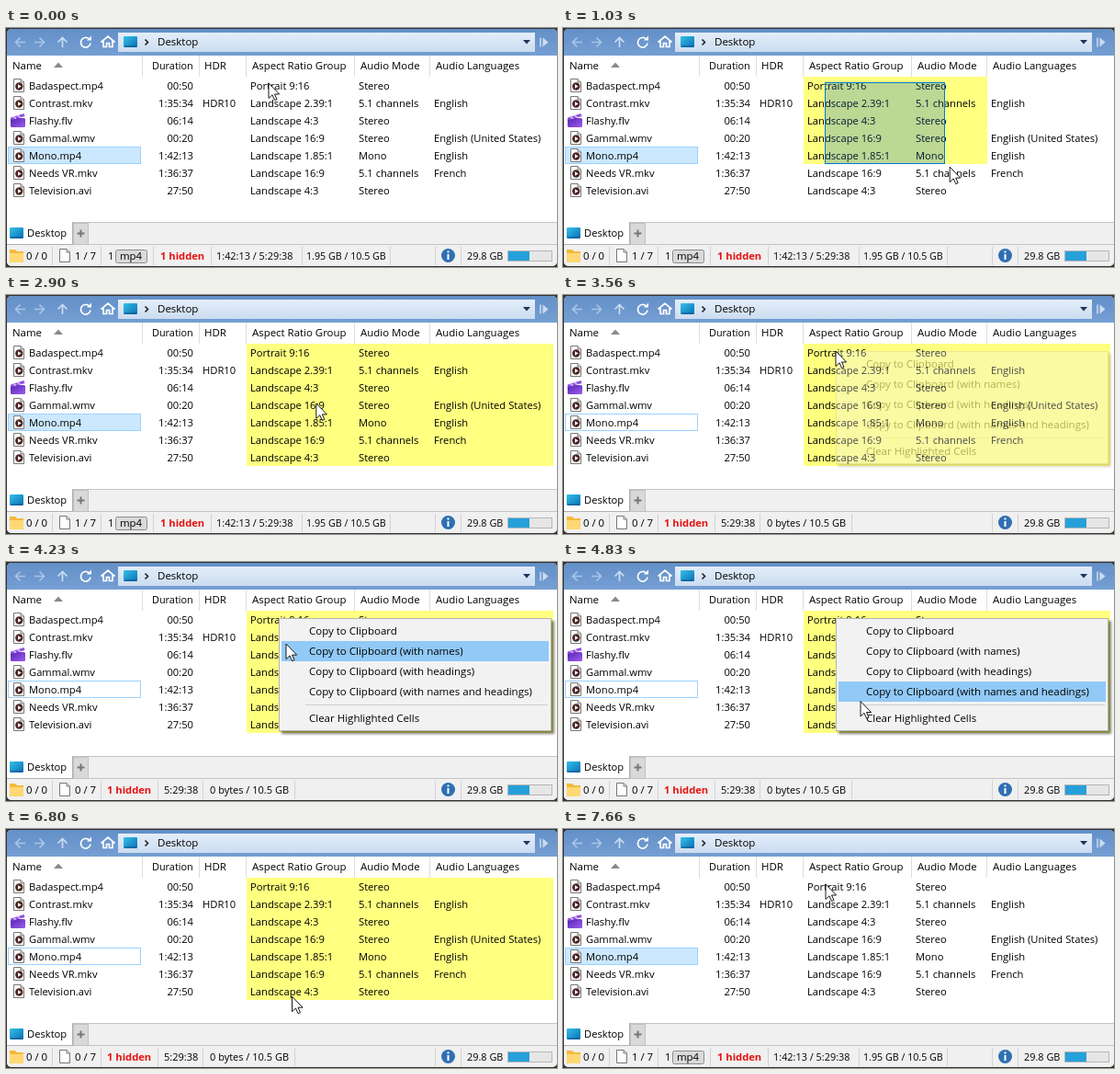
These frames come from a looping animation (600x260 px, 7.73 s). An HTML page:

```html
<!DOCTYPE html>
<html lang="en">
<head>
<meta charset="utf-8">
<title>Copying highlighted cells</title>
<style>
  html, body { margin: 0; width: 100%; height: 100%; overflow: hidden; background: #333; }
  svg { display: block; width: 600px; height: 260px; }
  text { font-family: "Open Sans", "Noto Sans", sans-serif; white-space: pre; }
  #window { clip-path: inset(1px 0 1px 1px round 5px); }
  #menu { filter: drop-shadow(3px 3px 1.5px rgba(0, 0, 0, .5)); }
</style>
</head>
<body>
<svg viewBox="0 0 600 260">
  <defs>
    <linearGradient id="bar" x2="0" y2="1"><stop stop-color="#638fc8"/><stop offset="1" stop-color="#759fd3"/></linearGradient>
    <linearGradient id="field" x2="0" y2="1"><stop stop-color="#e4eefa"/><stop offset="1" stop-color="#cbdcf0"/></linearGradient>
    <linearGradient id="screen" x2="1" y2="1"><stop stop-color="#35c1e8"/><stop offset="1" stop-color="#0a6fb5"/></linearGradient>
    <linearGradient id="board" x2="1" y2="1"><stop stop-color="#5a24b0"/><stop offset="1" stop-color="#9a5cf0"/></linearGradient>
    <g id="desktop"><rect width="15" height="12" rx="1" fill="url(#screen)"/><path d="M1 11H14" stroke="#0b4f86"/></g>
    <g id="page" fill="#fff" stroke="#777"><path d="M.5 .5H8L11.5 4V14.5H.5Z"/><path d="M8 .5V4H11.5" fill="none"/></g>
    <g id="video"><use href="#page"/><circle cx="6.3" cy="8.500" r="4.200" fill="#4b2624"/><path d="M5 6.200V10.800L8.700 8.500Z" fill="#fff"/></g>
    <g id="clapper"><rect y="5" width="16" height="10" rx="1.5" fill="url(#board)"/><path d="M0 4.5L14.5 0 15.5 3 1 7Z" fill="#9050e0"/><path d="M3 3.6L6 5.5M7.5 2.2L10.5 4.2" stroke="#d9bcff" stroke-width="1.5"/></g>
  </defs>

  <g id="window">
    <rect width="600" height="260" fill="#fff"/>
    <rect width="600" height="30" fill="url(#bar)"/>
    <g fill="none" stroke="#a9c4e6" stroke-width="1.7">
      <path d="M21 15.5H10.5M15.5 10.5L10.5 15.5 15.500 20.500"/>
      <path d="M31 15.5H41.5M36.5 10.5L41.5 15.5 36.5 20.5"/>
      <path d="M61.5 21V10.5M56.5 15.5L61.5 10.5 66.5 15.5" stroke="#cbdcf1"/>
      <path d="M90.5 12A5.3 5.3 0 1 0 92 16.5" stroke="#fff"/>
      <path d="M103.5 15.5L111 9 118.5 15.500M106 14V20.500H109.500V16.500H112.500V20.500H116V14" stroke="#fff"/>
    </g>
    <path d="M88 13.5H93V8.5Z" fill="#fff"/>
    <rect x="122" y="5" width="454" height="21" fill="url(#field)"/>
    <use href="#desktop" x="128" y="9"/>
    <path d="M151.5 12.500L154.500 15.500 151.500 18.500" fill="none" stroke="#222" stroke-width="1.600"/>
    <path d="M563 13H571L567 17.500Z" fill="#1d3557"/>
    <path d="M582 10.500V20.500" stroke="#cbdcf1" stroke-width="1.500"/>
    <path d="M584.500 10.500V20.500L590.500 15.500Z" fill="#cbdcf1"/>

    <path d="M148.5 30V53M210.5 30V53M261.5 30V53M379.5 30V53M461.5 30V53" stroke="#dedede"/>
    <path d="M52 43L57 37.5 62 43Z" fill="#8a8a8a"/>
    <rect id="cells" x="262" y="53" fill="#ffff80"/>
    <rect id="row" x="2.5" y="129.5" width="144" height="18" stroke="#99d1ff"/>
    <g id="table"></g>

    <rect y="211" width="600" height="49" fill="#f0f0f0"/>
    <path d="M0 211.5H600M0 235.5H600" stroke="#c4c4c4"/>
    <path d="M.5 211V235.5H72.5V211" fill="#fff" stroke="#b0b0b0"/>
    <rect x="1" y="210" width="71" height="3" fill="#fff"/>
    <use href="#desktop" x="4" y="217"/>
    <rect x="73.5" y="212.5" width="16" height="23" fill="#d9d9d9" stroke="#c0c0c0"/>
    <path d="M77.5 223.5H85.5M81.5 219.5V227.5" stroke="#777" stroke-width="2"/>

    <path d="M4 241H10L12 243H19V255H4Z" fill="#f5b93a"/>
    <rect x="4" y="245" width="15" height="10" rx="1" fill="#ffd873"/>
    <use href="#page" x="58" y="240"/>
    <path d="M50.5 238V258M103.5 238V258M467.5 238V258M495.5 238V258" stroke="#d2d2d2"/>
    <circle cx="481.5" cy="247.5" r="7.5" fill="#2f6fb3"/>
    <path d="M481.5 242.5V244.5M481.5 246V252" stroke="#fff" stroke-width="2"/>
    <rect x="546.5" y="242.5" width="48" height="11" fill="#e6e6e6" stroke="#b5b5b5"/>
    <rect x="547" y="243" width="23" height="10" fill="#26a0da"/>
    <g id="labels"></g>
    <g id="picked">
      <path d="M160.5 238V258M223.5 238V258M322.5 238V258M418.5 238V258" stroke="#d2d2d2"/>
      <rect x="119.5" y="241.5" width="34" height="14" rx="2" fill="#dadada" stroke="#8c8c8c"/>
    </g>
    <g id="unpicked"><path d="M165.5 238V258M214.5 238V258M314.5 238V258" stroke="#d2d2d2"/></g>

    <rect id="marquee" x="285.5" y="59.5" fill="#0066cc" fill-opacity=".26" stroke="#0078d7"/>
    <g id="menu">
      <rect x="297.5" y="61.5" width="296" height="122" fill="#f2f2f2" stroke="#b4b4b4"/>
      <rect id="hot" x="300" width="291" height="22" fill="#91c9f7"/>
      <path d="M326 155.5H590" stroke="#cfcfcf"/>
    </g>
  </g>
  <path id="cursor" d="M0 0V16.5L4 12.8 6.6 18.6 9 17.5 6.5 12H11.6Z" fill="#fff" stroke="#000" stroke-width=".9"/>
</svg>

<script>
const $ = id => document.getElementById(id);
const NS = "http://www.w3.org/2000/svg";
const LOOP = 7730, ROW = 19, TOP = 53;

function add(parent, tag, attrs, content = "") {
  const node = document.createElementNS(NS, tag);
  set(node, attrs);
  node.textContent = content;
  $(parent).append(node);
}
function set(node, attrs) {
  for (const name in attrs) node.setAttribute(name, attrs[name]);
}
function label(parent, x, y, content, size = 11.2, extra = {}) {
  add(parent, "text", { x, y, "font-size": size, ...extra }, content);
}
const atEnd = { "text-anchor": "end" };
const alert = { fill: "#e81010", "font-weight": 700 };

// File list
const columns = [
  [7, "Name"], [159, "Duration"], [216, "HDR"],
  [268, "Aspect Ratio Group"], [386, "Audio Mode"], [468, "Audio Languages"]
];
columns.forEach(([x, name]) => label("table", x, 45, name, name === "Duration" ? 10.9 : 11.45));

const files = [
  ["Badaspect.mp4", "00:50", "", "Portrait 9:16", "Stereo", ""],
  ["Contrast.mkv", "1:35:34", "HDR10", "Landscape 2.39:1", "5.1 channels", "English"],
  ["Flashy.flv", "06:14", "", "Landscape 4:3", "Stereo", ""],
  ["Gammal.wmv", "00:20", "", "Landscape 16:9", "Stereo", "English (United States)"],
  ["Mono.mp4", "1:42:13", "", "Landscape 1.85:1", "Mono", "English"],
  ["Needs VR.mkv", "1:36:37", "", "Landscape 16:9", "5.1 channels", "French"],
  ["Television.avi", "27:50", "", "Landscape 4:3", "Stereo", ""]
];
const cellX = [25, 204, 214, 266, 384, 466];
files.forEach((file, i) => {
  const y = TOP + ROW * i, flash = file[0].endsWith("flv");
  add("table", "use", { href: flash ? "#clapper" : "#video", x: flash ? 5 : 8, y: y + 2 });
  file.forEach((value, c) => label("table", cellX[c], y + 14, value, 11.2, c === 1 ? atEnd : {}));
});

// Address, tab and status texts
label("labels", 165, 19, "Desktop", 11.5);
label("labels", 23, 227, "Desktop");
label("labels", 22, 252, "0 / 0", 11.4);
label("labels", 502, 252, "29.8 GB", 10.9);
label("picked", 75, 252, "1 / 7", 11.4);
label("picked", 111, 252, "1");
label("picked", 124, 252, "mp4", 11.4);
label("picked", 168, 252, "1 hidden", 11.2, alert);
label("picked", 229, 252, "1:42:13 / 5:29:38", 10.9);
label("picked", 327, 252, "1.95 GB / 10.5 GB", 10.7);
label("unpicked", 75, 252, "0 / 7", 11.4);
label("unpicked", 110, 252, "1 hidden", 11.2, alert);
label("unpicked", 172, 252, "5:29:38", 11);
label("unpicked", 222, 252, "0 bytes / 10.5 GB", 11);

["Copy to Clipboard", "Copy to Clipboard (with names)", "Copy to Clipboard (with headings)",
 "Copy to Clipboard (with names and headings)", "Clear Highlighted Cells"]
  .forEach((item, i) => label("menu", 330, 79 + 22 * i + (i === 4 ? 7 : 0), item, 11.5));

// Pointer path: time, x, y
const path = [
  [0, 286, 60], [460, 286, 60], [1030, 421, 151], [1230, 449, 170], [1660, 497, 176],
  [2100, 497, 176], [2900, 338, 118], [3360, 297, 61], [3860, 297, 61], [4230, 305, 89],
  [4630, 319, 132], [4830, 324, 151.5], [6340, 324, 151.5], [6920, 310, 186], [7160, 310, 186],
  [7660, 286, 60], [LOOP, 286, 60]
];
function slope(i, axis) {
  const a = path[i - 1], b = path[i], c = path[i + 1];
  if (!a || !c || a[axis] === b[axis] || b[axis] === c[axis]) return 0;
  return (c[axis] - a[axis]) / (c[0] - a[0]);
}
function pointer(t) {
  const i = path.findIndex((p, n) => n === path.length - 1 || t < path[n + 1][0]);
  if (i === path.length - 1) return path[i].slice(1);
  const a = path[i], b = path[i + 1], span = b[0] - a[0], u = (t - a[0]) / span;
  return [1, 2].map(k =>
    a[k] + (b[k] - a[k]) * u * u * (3 - 2 * u) +
    span * u * (1 - u) * (slope(i, k) * (1 - u) - slope(i + 1, k) * u));
}

const clamp = (v, lo, hi) => Math.min(hi, Math.max(lo, v));
const show = (id, on) => $(id).style.display = on ? "" : "none";
const edges = [380, 462, 596];

function draw(t) {
  const [x, y] = pointer(t);
  set($("cursor"), { transform: `translate(${x.toFixed(1)} ${y.toFixed(1)})` });

  // The drag box trails the pointer slightly
  const [dx, dy] = t < 2100 ? pointer(Math.max(0, t - 24)) : [497, 176];
  const right = edges.find(edge => dx < edge);
  const rows = clamp(Math.floor((dy - TOP) / ROW) + 1, 1, 7);
  show("cells", t >= 300 && t < 6960);
  set($("cells"), { width: right - 262, height: rows * ROW });
  show("marquee", t >= 460 && t < 2100);
  set($("marquee"), { width: Math.max(0, Math.round(dx - 286)), height: Math.max(0, Math.round(dy - 60)) });

  const picked = t < 3360 || t >= 6960;
  show("picked", picked);
  show("unpicked", !picked);
  set($("row"), { fill: picked ? "#cce8ff" : "#fff" });

  show("menu", t >= 3530 && t < 6360);
  $("menu").style.opacity = clamp((t - 3500) / 200, 0, 1);
  const item = Math.floor((y - 64) / 22);
  show("hot", item >= 0 && item < 4);
  set($("hot"), { y: 64 + 22 * item });
}
function tick() {
  draw(performance.now() % LOOP);
  requestAnimationFrame(tick);
}
tick();
</script>
</body>
</html>
```
